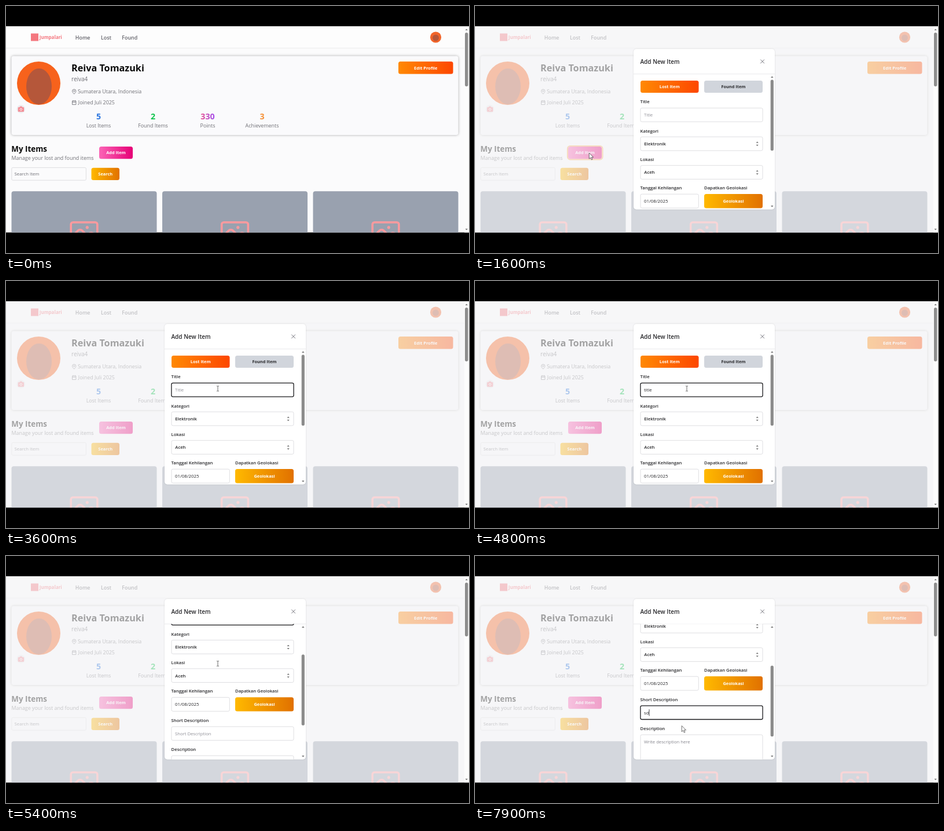
Write an HTML page that moves like this. It is 800 px wide and 427 px high and loops after 8 s.

```html
<!DOCTYPE html>
<html lang="id">
<head>
<meta charset="utf-8">
<title>Profile</title>
<style>
  html, body { margin: 0; width: 100%; height: 100%; overflow: hidden; background: #000; }
  svg { display: block; width: 100%; height: 100%; }
  text { font-family: "Open Sans", "Noto Sans", sans-serif; white-space: pre; }
</style>
</head>
<body>
<svg id="stage" viewBox="0 0 800 427" xmlns="http://www.w3.org/2000/svg"></svg>
<script>
const LOOP = 8000;
const stage = document.getElementById('stage');

// Markup helpers
const text = (x, y, str, size, fill, weight = 400, anchor = 'start', extra = '') =>
  `<text x="${x}" y="${y}" font-size="${size}" fill="${fill}" font-weight="${weight}" text-anchor="${anchor}" ${extra}>${str}</text>`;
const rect = (x, y, w, h, fill, r = 0, extra = '') =>
  `<rect x="${x}" y="${y}" width="${w}" height="${h}" rx="${r}" fill="${fill}" ${extra}/>`;
const circle = (x, y, r, fill, extra = '') =>
  `<circle cx="${x}" cy="${y}" r="${r}" fill="${fill}" ${extra}/>`;
const path = (d, extra) => `<path d="${d}" ${extra}/>`;
const gradient = (id, from, to) =>
  `<linearGradient id="${id}"><stop stop-color="${from}"/><stop offset="1" stop-color="${to}"/></linearGradient>`;
const button = (x, y, w, h, label, fill, color = '#fff') =>
  rect(x, y, w, h, fill, 3.5) + text(x + w / 2, y + h / 2 + 2.8, label, 7.4, color, 700, 'middle');
const box = (x, y, w, h, id = '') =>
  rect(x, y, w, h, '#fff', 2.5, `stroke="#d6d6da" stroke-width=".8" ${id && `id="${id}"`}`);
const label = (x, y, str) => text(x, y, str, 7.7, '#27272a', 600);
const arrow = (x, y, dir, r = 2.2) =>
  path(`M${x - r} ${y + dir * r * .6}h${2 * r}l${-r} ${-dir * r * 1.2}z`, 'fill="#777"');

const defs = `<defs>
  ${gradient('orange', '#ff8904', '#fd4700')}
  ${gradient('amber', '#ffb900', '#e17100')}
  ${gradient('pink', '#fb64b6', '#e60076')}
  <linearGradient id="shimmer" gradientUnits="userSpaceOnUse" x1="336" x2="361" spreadMethod="reflect">
    <stop stop-color="#e8508f"/><stop offset="1" stop-color="#a04df0"/>
  </linearGradient>
  <clipPath id="pageClip"><rect y="35" width="800" height="356.4"/></clipPath>
  <clipPath id="bodyClip"><rect x="274" y="117.5" width="244" height="234"/></clipPath>
  <clipPath id="avatarClip"><circle cx="56.5" cy="133.5" r="37.5"/></clipPath>
</defs>`;

function header() {
  const nav = [[119.8, 'Home'], [164, 'Lost'], [200.3, 'Found']];
  return rect(0, 35, 792, 38, '#fdfdfd') + rect(0, 72.5, 792, .8, '#e6e6e8')
    + rect(43, 47.5, 13, 13, '#f4777f')
    + text(57.8, 57.4, 'Jumpalari', 8, '#f4777f', 700)
    + nav.map(([x, s]) => text(x, 57.6, s, 8.9, '#63636a', 600)).join('')
    + circle(742.5, 54, 9.6, '#f2652a') + circle(742.5, 55, 5.5, '#b5573a');
}

function profile() {
  const stats = [
    [160, '5', 'Lost Items', '#2f78e0'],
    [254, '2', 'Found Items', '#12c44f'],
    [348.5, '330', 'Points', 'url(#shimmer)'],
    [442.5, '3', 'Achievements', '#f6923a']
  ];
  const line = 'fill="none" stroke="#77777d" stroke-width=".9"';
  return rect(9.5, 86.5, 772, 136.5, '#fafafc', 4, 'style="filter:drop-shadow(0 .5px 2px #0005)"')
    + circle(56.5, 133.5, 37.5, '#f7621c')
    + '<ellipse cx="57" cy="139" rx="22" ry="31" fill="#b5573a" clip-path="url(#avatarClip)"/>'
    + circle(25.8, 178.2, 7.2, '#ececef')
    + path('M21.2 175.5h2.3l1-1.6h2.8l1 1.6h2.3v6.8h-9.4z', 'fill="#f38a93" stroke="#f38a93" stroke-width=".8" stroke-linejoin="round"')
    + circle(25.9, 178.7, 1.8, 'none', 'stroke="#fff" stroke-width=".9"')
    + text(113, 113.4, 'Reiva Tomazuki', 16.2, '#0a0a0a', 700)
    + text(113, 129.6, 'reiva4', 10, '#707076')
    + path('M117.7 152.2c-2-2.2-3.2-3.4-3.2-5a3.2 3.2 0 0 1 6.4 0c0 1.6-1.2 2.8-3.2 5z', line)
    + circle(117.7, 147.2, 1.1, 'none', 'stroke="#77777d" stroke-width=".8"')
    + text(124, 151.4, 'Sumatera Utara, Indonesia', 8.9, '#707076')
    + path('M114.5 164.2h6.4v6.2h-6.4zM114.5 166.3h6.4M116 162.8v2M119.4 162.8v2', line)
    + text(124.8, 170.4, 'Joined Juli 2025', 8.9, '#707076')
    + stats.map(([x, n, s, c]) =>
        text(x, 196.2, n, 14.2, c, 700, 'middle') + text(x, 210.2, s, 8.9, '#707076', 400, 'middle')).join('')
    + button(678, 96, 94.5, 21.5, 'Edit Profile', 'url(#orange)');
}

function items() {
  const photo = 'm2.25 15.75 5.159-5.159a2.25 2.25 0 0 1 3.182 0l5.159 5.159m-1.5-1.5 1.409-1.409a2.25 2.25 0 0 1 3.182 0l2.909 2.909'
    + 'm-18 3.75h16.5a1.5 1.5 0 0 0 1.5-1.5V6a1.5 1.5 0 0 0-1.5-1.5H3.75A1.5 1.5 0 0 0 2.25 6v12a1.5 1.5 0 0 0 1.5 1.5Z';
  const card = x => rect(x, 320.3, 251, 90, '#99a1af', 4)
    + `<g transform="translate(${x + 97.4} 363.5) scale(2.343)">`
    + path(photo, 'fill="none" stroke="#ff9a9e" stroke-width="1.5" stroke-linejoin="round"')
    + circle(14.25, 8.25, 1.1, '#ff9a9e') + '</g>';
  return text(9.3, 252.3, 'My Items', 13.4, '#0a0a0a', 700)
    + text(9.5, 266.3, 'Manage your lost and found items', 8.9, '#707076')
    + rect(160, 242, 60.4, 23.4, 'none', 4.5, 'id="ring" stroke="#fbb05c" stroke-width="2.2"')
    + button(161, 243, 58, 21.2, 'Add Item', 'url(#pink)')
    + rect(9.8, 279.4, 128.6, 21.8, '#fbfbfc', 2, 'stroke="#d6d6da" stroke-width=".8"')
    + text(14.5, 293.3, 'Search Item', 7.8, '#6f6f76')
    + button(147.5, 279.8, 48.5, 21.2, 'Search', 'url(#amber)')
    + [9.5, 270, 530.5].map(card).join('');
}

function form() {
  const select = (y, value) => box(286, y, 211, 23.8)
    + text(292.3, y + 14.8, value, 7.7, '#27272a', 600)
    + arrow(487.7, y + 9.4, 1, 2.1) + arrow(487.7, y + 14.8, -1, 2.1);
  const field = (id, y, hint) => box(285.9, y, 211.2, 23.7, id + 'Box')
    + text(292, y + 14.7, hint, 7.7, '#8f8f97', 400, 'start', `id="${id}Hint"`)
    + text(292, y + 14.7, '', 7.7, '#27272a', 400, 'start', `id="${id}Text"`)
    + rect(292, y + 6.3, .8, 11.4, '#18181b', 0, `id="${id}Caret"`);
  return button(286, 129, 100.5, 21, 'Lost Item', 'url(#orange)')
    + button(396, 129, 101, 21, 'Found Item', '#d1d5dc', '#27272a')
    + label(285.6, 168.4, 'Title') + field('title', 176.4, 'Title')
    + label(285.6, 218.7, 'Kategori') + select(226.2, 'Elektronik')
    + label(285.6, 268, 'Lokasi') + select(275.6, 'Aceh')
    + label(285.6, 317.2, 'Tanggal Kehilangan') + label(396, 317.2, 'Dapatkan Geolokasi')
    + box(286, 325.2, 100.3, 24) + text(292, 340.2, '01/08/2025', 7.8, '#27272a')
    + button(396, 325, 101, 24.4, 'Geolokasi', 'url(#amber)')
    + label(285.6, 367.8, 'Short Description') + field('short', 375.8, 'Short Description')
    + label(285.6, 418.2, 'Description') + box(286, 426, 211, 62)
    + text(292, 440.8, 'Write description here', 7.7, '#85858d');
}

function modal() {
  return rect(0, 35, 792, 357, '#f4f4f6', 0, 'opacity=".65"')
    + rect(274, 74.2, 244, 277.6, '#fff', 5, 'style="filter:drop-shadow(0 .5px 1px #0002)"')
    + text(285.5, 99.8, 'Add New Item', 10, '#27272a', 600)
    + path('M493.3 92.6l6.6 6.6m0-6.6l-6.6 6.6', 'stroke="#71717a" stroke-width="1"')
    + rect(274, 117, 244, .8, '#e6e6e9')
    + `<g clip-path="url(#bodyClip)"><g id="form">${form()}</g></g>`
    + arrow(513.3, 122.6, 1) + arrow(513.3, 346.4, -1)
    + rect(510.7, 127.5, 5.2, 122.5, '#8b8b8b', 2.6, 'id="thumb"');
}

const scrollbar = rect(792, 35, 8, 357, '#fcfcfc') + rect(793, 46, 5.4, 93, '#8d8d8d', 2.7)
  + arrow(795.7, 40.8, 1) + arrow(795.7, 386.2, -1);

const pointer = path('M0 0v10.2l2.4-2.2 1.7 3.8 1.7-.8-1.7-3.6h3.3z',
    'id="arrow" fill="#fff" stroke="#333" stroke-width=".7" stroke-linejoin="round"')
  + path('M-2-4.3h1.3l.7.6.7-.6H2M-2 4.3h1.3l.7-.6.7.6H2M0-3.7v7.4',
    'id="beam" fill="none" stroke="#444" stroke-width=".8"');

stage.innerHTML = defs + `<g clip-path="url(#pageClip)">
  ${rect(0, 35, 800, 357, '#fbfbfc')}${header()}${profile()}${items()}
  <g id="modal">${modal()}</g>${scrollbar}
  <g id="pointer">${pointer}</g></g>`;

const $ = id => document.getElementById(id);
const show = (id, on) => $(id).setAttribute('visibility', on ? 'inherit' : 'hidden');
const clamp = v => Math.min(1, Math.max(0, v));
const smooth = p => p * p * (3 - 2 * p);

// Pointer stops: [start, end, x, y], moving between start and end
const moves = [
  [500, 500, 290, 400],
  [500, 1100, 197.2, 254],
  [1850, 2300, 366, 186],
  [5700, 6120, 362.8, 267],
  [7900, 7900, 357.2, 293.5]
];

function pointerAt(t) {
  let [, , x, y] = moves[0];
  for (const [start, end, tx, ty] of moves) {
    if (t < start) break;
    const p = end > start ? smooth(clamp((t - start) / (end - start))) : 1;
    x += (tx - x) * p;
    y += (ty - y) * p;
  }
  return [x, y];
}

const fields = [
  { id: 'title', value: 'title', focus: 2800, blur: 6300, keys: [3800, 3900, 4000, 4100, 4200] },
  { id: 'short', value: 'sd', focus: 6300, blur: LOOP, keys: [7200, 7500] }
];

function drawField({ id, value, focus, blur, keys }, t) {
  const typed = keys.filter(k => k <= t).length;
  const focused = t >= focus && t < blur;
  const lastEdit = typed ? keys[typed - 1] : focus;
  const content = $(id + 'Text');
  content.textContent = value.slice(0, typed);
  show(id + 'Hint', !typed);
  $(id + 'Box').setAttribute('stroke', focused ? '#18181b' : '#d6d6da');
  $(id + 'Box').setAttribute('stroke-width', focused ? 1.3 : .8);
  $(id + 'Caret').setAttribute('x', 292 + (typed ? content.getComputedTextLength() + .2 : 0));
  show(id + 'Caret', focused && (t - lastEdit) % 1000 < 500);
}

function draw(t) {
  const shift = 25 * t / 1500;
  $('shimmer').setAttribute('x1', 336 - shift);
  $('shimmer').setAttribute('x2', 361 - shift);

  show('ring', t >= 1400 && t < 2800);
  show('modal', t >= 1600);
  fields.forEach(f => drawField(f, t));

  const scroll = 117 * Math.sin(Math.PI / 2 * clamp((t - 4900) / 1030));
  $('form').setAttribute('transform', `translate(0 ${-scroll})`);
  $('thumb').setAttribute('y', 127.5 + scroll * .53);

  const [x, y] = pointerAt(t);
  const beam = t >= 2200 && t < 7900;
  $('pointer').setAttribute('transform', `translate(${x} ${y})`);
  show('pointer', t >= 500);
  show('arrow', !beam);
  show('beam', beam);
}

let origin;
function tick(now) {
  origin ??= now;
  draw((now - origin) % LOOP);
  requestAnimationFrame(tick);
}
draw(0);
requestAnimationFrame(tick);
</script>
</body>
</html>
```
